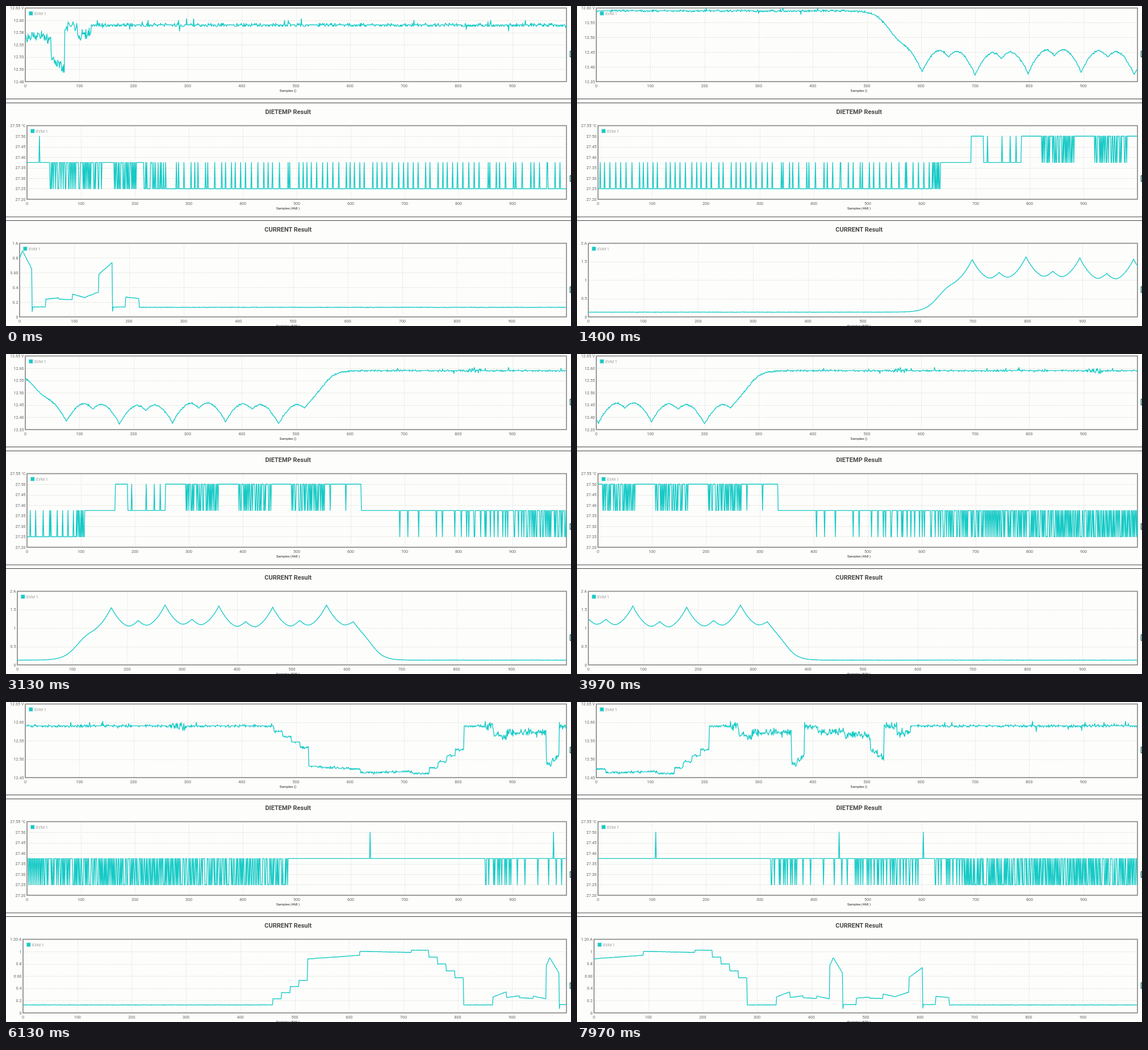
Animation, 995 px wide and 563 px high, one loop 8000 ms. Source, as an HTML page:

```html
<!DOCTYPE html>
<html lang="en">
<head>
<meta charset="utf-8">
<title>Sensor results</title>
<style>
  html, body { margin: 0; width: 100%; height: 100%; overflow: hidden; background: #fdfdfc; }
  svg { display: block; font-family: Roboto, Arial, sans-serif; }
  .tick { font-size: 7.2px; fill: #666; }
  .legend { font-size: 7.2px; fill: #999; }
  .title { font-size: 11px; font-weight: 700; fill: #484848; text-anchor: middle; }
  .unit { font-size: 6.1px; fill: #222; text-anchor: middle; }
  .grid { stroke-width: 1; stroke-dasharray: 2 1.5; }
  .frame { fill: none; stroke: #8b8b8b; stroke-width: 1.7; }
  .line { fill: none; stroke: #16cac6; stroke-width: 1.35; stroke-linejoin: round; }
</style>
</head>
<body>
<svg id="stage" width="995" height="563" viewBox="0 0 995 563"></svg>
<script>
const LOOP = 8000, SPAN = 1000, RIGHT = 987, TOTAL = 3760, HEIGHT = 129.5;
const stage = document.getElementById('stage');

function el(parent, tag, attrs, text) {
  const node = document.createElementNS('http://www.w3.org/2000/svg', tag);
  for (const key in attrs) node.setAttribute(key, attrs[key]);
  if (text !== undefined) node.textContent = text;
  parent.appendChild(node);
  return node;
}

function random(seed) {
  return () => {
    seed = (seed + 0x6D2B79F5) | 0;
    let r = Math.imul(seed ^ (seed >>> 15), 1 | seed);
    r = (r + Math.imul(r ^ (r >>> 7), 61 | r)) ^ r;
    return ((r ^ (r >>> 14)) >>> 0) / 4294967296;
  };
}

const mix = (a, b, u) => a + (b - a) * u;
const within = (i, a, b) => i >= a && i < b;
const sigmoid = x => 1 / (1 + Math.exp(-x));
const series = fn => Array.from({ length: TOTAL }, (_, i) => fn(i));

// ---- Current in amperes ----
const IDLE = .13, SLOT = 24.4, TEST = 2909, FIRST_TEST = -99;
// Load at the start and end of each slot of the test cycle
const slots = [[.26, .345], [.25, .28], [.25, .235], [.275, .23], [.77, .64], [.135, .135],
  [.24, .26], [.24, .235], [.31, .26], [.27, .34], [.58, .74], [.135, .135], [.27, .25]];

function testLoad(i) {
  const n = Math.floor(i / SLOT), u = i / SLOT - n;
  if (!slots[n]) return IDLE;
  const [from, to] = slots[n];
  if (from < .14 && u < 1 / SLOT) return .075;
  const hump = n === 4 ? .165 * Math.min(u / .27, (1 - u) / .73) : 0;
  return mix(from, to, u) + hump;
}

// Steady load with alternating tall and small surges
function swingLoad(i) {
  const base = .92 + .035 * Math.cos((i - 1340) / 290 * 2 * Math.PI);
  let amps = IDLE + base * sigmoid((i - 1154) / 13) * sigmoid((1686 - i) / 12);
  for (let k = 0; k < 10; k++) {
    const [height, reach] = k % 2 ? [.16, 22] : [.55, 38];
    amps += height * Math.max(0, 1 - Math.abs(i - 1214 - 49 * k) / reach) ** 2;
  }
  return amps;
}

// Four steps up, a long plateau, four steps down
function stairLoad(i) {
  if (i < 2568) return .23 + .1 * Math.floor((i - 2504) / 16);
  if (i < 2664) return mix(.88, .94, (i - 2568) / 96);
  if (i < 2759) return mix(1.005, .985, (i - 2664) / 95);
  if (i < 2791) return 1.022;
  return .91 - .112 * Math.floor((i - 2791) / 16);
}

function load(i) {
  if (i < 400) return testLoad(i - FIRST_TEST);
  if (i < 1800) return swingLoad(i);
  if (within(i, 2504, 2855)) return stairLoad(i);
  return testLoad(i - TEST);
}

function makeCurrent() {
  const rnd = random(5);
  return series(i => load(i) + (rnd() - .5) * .007);
}

// ---- Bus voltage: sags with the load ----
function makeVoltage() {
  const rnd = random(11), lsb = .003125;
  return series(i => {
    const amps = Math.max(load(i), .125);
    const testing = i < 217 || within(i, 2885, 3225);
    const noisy = within(i, 1955, 1982) || within(i, 2310, 2342);
    let noise = (rnd() + rnd() - 1) * .0036 * (testing || noisy ? 3.6 : 1);
    if (amps < .14 && rnd() < .03) noise += (.004 + .009 * rnd()) * (rnd() < .65 ? 1 : -1);
    return Math.round((12.609 - .145 * amps + noise) / lsb) * lsb;
  });
}

// ---- Die temperature: [until sample, mean level in converter codes] ----
const drift = [[40, 1], [140, .66], [160, 1], [204, .55], [216, 1], [252, .35], [1134, .1],
  [1152, .5], [1207, 1], [1230, 2], [1300, 1.05], [1338, 2], [1600, 1.6], [1663, 1.97],
  [1728, 1], [1848, .95], [1960, .85], [2130, .65], [2528, .5], [2890, 1], [2942, .78],
  [3045, .94], [3172, .78], [3192, 1], [3250, .82], [3345, .4], [TOTAL, .5]];
const spikes = [23, 2680, 3020, 3176];

function makeTemp() {
  const rnd = random(23);
  let err = 0;
  return series(i => {
    let level = drift.find(([end]) => i < end)[1];
    if (level === 1.6 && (i - 1338) % 98 > 60) level = 2;
    const guess = Math.floor(level + err * .5 + rnd());
    const code = Math.min(Math.ceil(level), Math.max(Math.floor(level), guess));
    err = Number.isInteger(level) ? 0 : err + level - code;
    return 27.25 + .125 * (spikes.includes(i) ? 2 : code);
  });
}

// ---- Axis ranges ----
function voltRange(lo, hi) {
  const size = hi - lo, step = size > .125 ? .05 : size > .06 ? .025 : .01;
  return [Math.floor(lo / step + 1e-6) * step, Math.ceil(hi / step - 1e-6) * step, step];
}
function ampRange(lo, hi) {
  const step = hi > 1.2 ? .5 : hi > .5 ? .2 : hi > .25 ? .1 : .05;
  return [0, Math.ceil(hi / step) * step, step];
}
const twoDigits = v => (Math.round(v * 100 + 1e-6) / 100).toFixed(2);
const plain = v => String(v).length > 4 ? v.toFixed(2) : String(v);

// ---- Data arrives in blocks; each chart redraws at its own moment ----
// [block, arrival in ms, first visible sample]
const arrivals = [[0, -150, 0], [1, 90, 97], [6, 1315, 515], [7, 1560, 612], [12, 3035, 1043],
  [15, 3863, 1329], [16, 4130, 1406], [19, 5030, 1684], [20, 5330, 1763], [23, 6080, 2044],
  [29, 7780, 2573], [30, 8070, 2646]];

function arrival(block) {
  const n = Math.max(1, arrivals.findIndex(row => row[0] >= block));
  const [a, b] = [arrivals[n - 1], arrivals[n]];
  const u = (block - a[0]) / (b[0] - a[0]);
  return { time: mix(a[1], b[1], u), start: Math.round(mix(a[2], b[2], u)) };
}
const blocks = Array.from({ length: 31 }, (_, k) => arrival(k));

const windowStart = (t, lead) => blocks.filter(b => b.time - lead <= t).pop().start;

const charts = [
  { unit: 'V', label: 'Samples ()', data: makeVoltage(), range: voltRange, format: twoDigits, lead: 180 },
  { unit: '°C', label: 'Samples (468 )', title: 'DIETEMP Result', data: makeTemp(),
    range: () => [27.2, 27.55, .05], format: twoDigits, lead: 60 },
  { unit: 'A', label: 'Samples (520 )', title: 'CURRENT Result', data: makeCurrent(),
    range: ampRange, format: plain, lead: 0 }];

function draw(chart, start) {
  const { group, top, unit } = chart, bottom = top + HEIGHT;
  const part = chart.data.slice(start, start + SPAN + 1);
  const [lo, hi, step] = chart.range(Math.min(...part), Math.max(...part));
  const count = Math.round((hi - lo) / step), labels = [];
  for (let i = 0; i <= count; i++) labels.push(chart.format(lo + i * step));
  labels[count] += ' ' + unit;
  // The plot makes room for its widest label
  const left = Math.round(10.5 + 3.3 * Math.max(...labels.map(s => s.length)));
  const X = s => left + s * (RIGHT - left) / SPAN;
  const Y = v => bottom - (v - lo) / (hi - lo) * HEIGHT;

  group.textContent = '';
  for (let s = 0; s < SPAN; s += 100) {
    if (s) el(group, 'path', { class: 'grid', stroke: '#e3e3ee', d: `M${Math.round(X(s)) + .5} ${top}V${bottom}` });
    el(group, 'text', { class: 'tick', x: X(s), y: bottom + 9.8, 'text-anchor': 'middle' }, s);
  }
  labels.forEach((text, i) => {
    const y = Y(lo + i * step);
    if (i && i < count) el(group, 'path', { class: 'grid', stroke: '#e0e0d5', d: `M${left} ${Math.round(y) + .5}H${RIGHT}` });
    el(group, 'text', { class: 'tick', x: left - 2.5, y: y + 2.6, 'text-anchor': 'end' }, text);
  });
  el(group, 'rect', { class: 'frame', x: left, y: top, width: RIGHT - left, height: HEIGHT });
  el(group, 'path', { class: 'line',
    d: 'M' + part.map((v, i) => X(i).toFixed(1) + ' ' + Y(v).toFixed(1)).join('L') });
  el(group, 'rect', { x: left + 6.2, y: top + 6, width: 7, height: 7, fill: '#16cac6', stroke: '#bfe9e8', 'stroke-width': .8 });
  el(group, 'text', { class: 'legend', x: left + 16, y: top + 12.1 }, 'EVM 1');
}

for (const y of [163.5, 170.5, 371, 377.5])
  el(stage, 'path', { d: `M0 ${y}H995`, stroke: '#444', 'stroke-width': 1 });
for (const y of [79.5, 298.5, 494])
  el(stage, 'rect', { x: 993.5, y, width: 8, height: 10, fill: 'none', stroke: '#12605f', 'stroke-width': 1.3 });
charts.forEach((chart, n) => {
  chart.top = 3.5 + 207 * n;
  if (chart.title) el(stage, 'text', { class: 'title', x: 496.7, y: chart.top - 21 }, chart.title);
  el(stage, 'text', { class: 'unit', x: 496.5, y: chart.top + 147.7 }, chart.label);
  chart.group = el(stage, 'g', {});
});

function render(t) {
  for (const chart of charts) {
    const start = windowStart(t, chart.lead);
    if (start !== chart.start) draw(chart, chart.start = start);
  }
}

const begin = performance.now();
function tick() {
  render((performance.now() - begin) % LOOP);
  requestAnimationFrame(tick);
}
tick();
</script>
</body>
</html>
```
